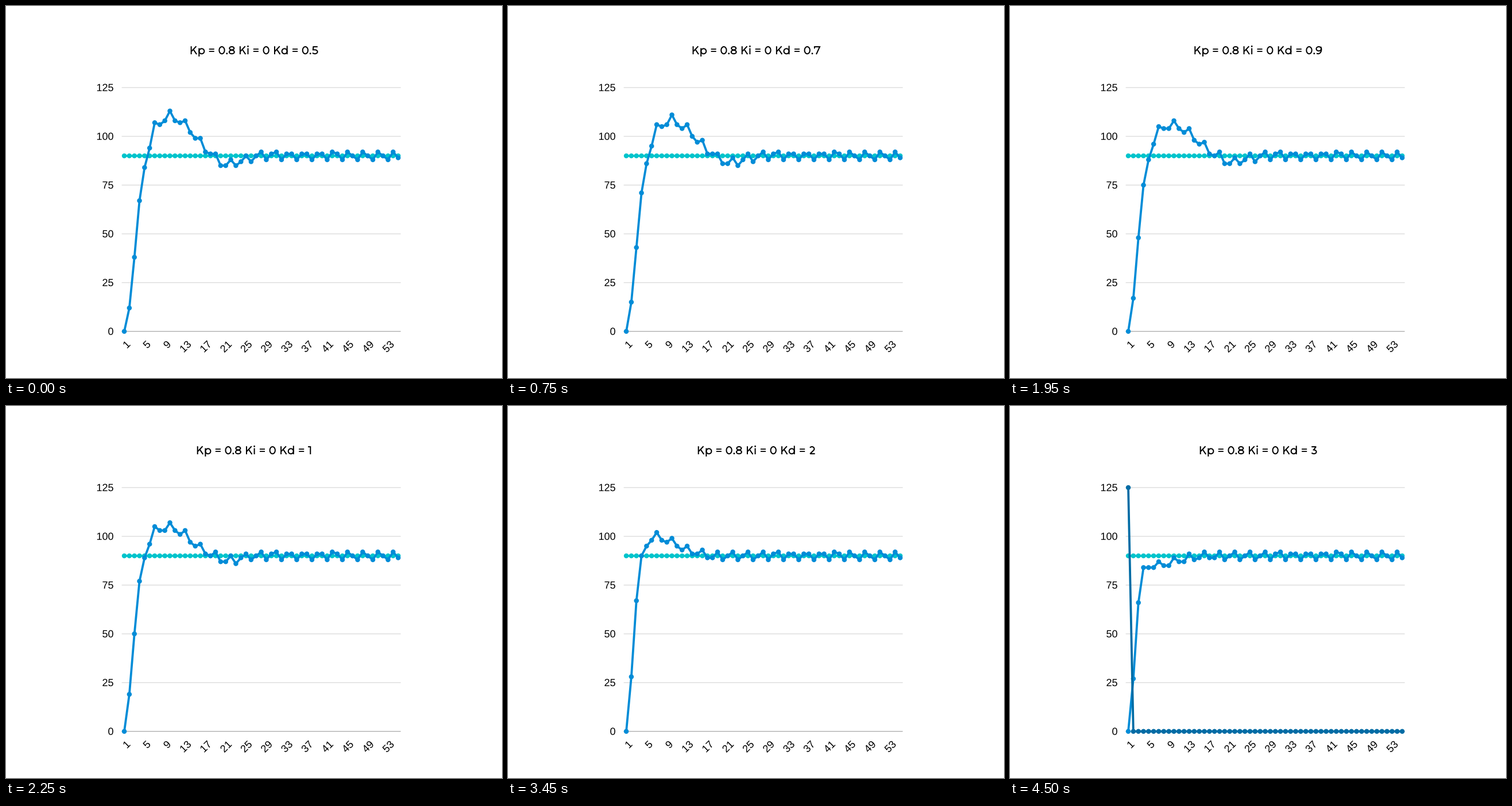
Recreate the animation shown at these times as a matplotlib script. Size 864 by 648 pixels, loop 5.25 s.

```python
import numpy as np
import matplotlib.pyplot as plt
from matplotlib.animation import FuncAnimation
from matplotlib.collections import EllipseCollection
from matplotlib.patches import Circle, PathPatch
from matplotlib.textpath import TextPath
from matplotlib.transforms import Affine2D

W, H = 864, 648
DPI = 72  # one point equals one pixel
TEAL, BLUE, NAVY = "#00c4cc", "#008cd7", "#006ca5"
GRID, AXIS = "#d3d3d3", "#9a9a9a"
COUNT, SETPOINT = 55, 90
LEFT, RIGHT, BASE, TOP = 201.6, 687.6, 566.8, 142.1
SAMPLE = np.arange(1, COUNT + 1)
GAINS = [0.5, 0.7, 0.9, 1, 2, 2.5, 3]

plt.rcParams["font.family"] = "Liberation Sans"

# ---- step response ----------------------------------------------------

# Smooth rise, overshoot and settling at a few samples for three gains.
KEY_N = [1, 2, 3, 4, 5, 7, 10, 13, 17, 21, 27]
KEY_CURVES = {
    0.5: [0, 12, 38, 67, 84, 105, 111, 106, 93.5, 85, 90],
    2: [0, 28, 67, 90, 95, 100, 97, 93, 90, 90, 90],
    3: [0, 27, 66, 84, 84, 84.5, 87, 89, 90, 90, 90],
}


def step_response(kd):
    """Key curves blended by gain, plus sensor ripple, in whole units."""
    gains = np.sqrt(list(KEY_CURVES))
    keys = [np.interp(np.sqrt(kd), gains, column)
            for column in zip(*KEY_CURVES.values())]
    ripple = 2.2 * np.cos(2 * np.pi * (SAMPLE - 7.1) / 2.94)
    return np.round(np.interp(SAMPLE, KEY_N, keys) + ripple * (SAMPLE > 6))


# ---- geometric title lettering, in em units ---------------------------


def arc(cx, cy, rx, ry, a=0, b=360):
    t = np.radians(np.linspace(a, b, 40))
    return list(zip(cx + rx * np.cos(t), cy + ry * np.sin(t)))


def bar(x, y0, y1):
    return [(x, y0), (x, y1)]


def dot(x, y):
    return [(x, y)]


HOOK = arc(.28, .24, .24, .194, -100, -145)

# character: (advance, strokes)
GLYPHS = {
    " ": (.264, []),
    "K": (.698, [bar(.15, 0, .7), [(.59, .7), (.18, .26)],
                 [(.34, .42), (.625, 0)]]),
    "p": (.676, [bar(.137, -.194, .534), arc(.365, .267, .225, .225)]),
    "d": (.676, [bar(.539, 0, .742), arc(.311, .267, .225, .225)]),
    "i": (.269, [bar(.135, 0, .534), dot(.135, .695)]),
    "=": (.593, [[(.07, .25), (.523, .25)], [(.07, .45), (.523, .45)]]),
    ".": (.221, [dot(.11, .065)]),
    "0": (.661, [arc(.33, .35, .232, .308)]),
    "1": (.370, [[(.01, .655), (.22, .655), (.22, 0)]]),
    "2": (.571, [arc(.28, .47, .2, .188, 148, -35)
                 + [(.12, .047), (.54, .047)]]),
    "3": (.571, [[(.07, .655), (.46, .655), (.25, .385)]
                 + arc(.28, .212, .21, .166, 90, -90) + HOOK]),
    "5": (.601, [[(.52, .655), (.15, .655), (.125, .39)]
                 + arc(.28, .217, .23, .173, 90, -90) + HOOK]),
    "7": (.613, [[(.085, .5), (.085, .655), (.54, .655), (.24, 0)]]),
    "8": (.632, [arc(.316, .522, .2, .138), arc(.316, .2, .224, .155)]),
    "9": (.632, [arc(.29, .475, .215, .183),
                 arc(.235, .42, .285, .375, 40, -90) + [(.1, .075)]]),
}
EM, TITLE_Y = 19.95, 84.1


def draw_title(text):
    x = W / 2 - EM * sum(GLYPHS[c][0] for c in text) / 2
    parts = []
    for c in text:
        advance, strokes = GLYPHS[c]
        for stroke in strokes:
            xs, ys = np.transpose(stroke) * EM
            xs, ys = x + xs, TITLE_Y - ys
            if len(stroke) == 1:
                parts.append(ax.add_patch(Circle((xs[0], ys[0]), 1.4,
                                                 color="black", lw=0)))
            else:
                parts += ax.plot(xs, ys, color="black", snap=False,
                                 lw=1.8 if c == "=" else 2,
                                 solid_capstyle="butt",
                                 solid_joinstyle="miter")
        x += EM * advance
    return parts


# ---- chart ------------------------------------------------------------

fig = plt.figure(figsize=(W / DPI, H / DPI), dpi=DPI, facecolor="white")
ax = fig.add_axes([0, 0, 1, 1])
ax.set_xlim(0, W)
ax.set_ylim(H, 0)
ax.axis("off")


def px(n):
    return LEFT + (RIGHT - LEFT) * (n - .5) / COUNT


def py(v):
    return BASE - (BASE - TOP) * np.asarray(v) / 125


def label(number, x, y, angle=0, size=18):
    """Number whose last digit ends at x on the baseline y."""
    text = str(number)
    width = .556 * size * len(text)
    place = (Affine2D().translate(-width, 0).scale(1, -1)
             .rotate_deg(-angle).translate(x, y))
    outline = TextPath((0, 0), text, size=size).transformed(place)
    ax.add_patch(PathPatch(outline, color="black", lw=0))


class Series:
    """Line with round markers placed at sub-pixel positions."""

    def __init__(self, values, color, z):
        self.line, = ax.plot([], [], color=color, lw=3.8, zorder=z,
                             solid_joinstyle="round")
        size = np.full(COUNT, 8.5)
        self.dots = EllipseCollection(
            size, size, np.zeros(COUNT), units="points", facecolors=color,
            linewidths=0, zorder=z, offsets=np.zeros((COUNT, 2)),
            offset_transform=ax.transData)
        ax.add_collection(self.dots, autolim=False)
        self.set(values)

    def set(self, values):
        x, y = px(SAMPLE), py(values)
        self.line.set_data(x, y)
        self.dots.set_offsets(np.column_stack([x, y]))

    def show(self, visible):
        self.line.set_visible(visible)
        self.dots.set_visible(visible)


for v in range(0, 126, 25):
    y = py(v)
    ax.plot([LEFT, RIGHT], [y, y], color=GRID if v else AXIS, lw=1.1,
            zorder=1, snap=False, solid_capstyle="butt")
    label(v, 187.5, y + 6.1)

for n in range(1, COUNT, 4):
    label(n, px(n) + 11.7, 590.4, angle=45)

Series(np.full(COUNT, SETPOINT), TEAL, 2)
response = Series(np.zeros(COUNT), BLUE, 3)
spike = Series(np.where(SAMPLE == 1, 125, 0), NAVY, 4)
title = []


def update(i):
    kd = GAINS[i]
    response.set(step_response(kd))
    spike.show(kd > 2)
    while title:
        title.pop().remove()
    title.extend(draw_title(f"Kp = 0.8 Ki = 0 Kd = {kd:g}"))


anim = FuncAnimation(fig, update, frames=len(GAINS), interval=750,
                     repeat=True, repeat_delay=0, blit=False)
plt.show()
```
